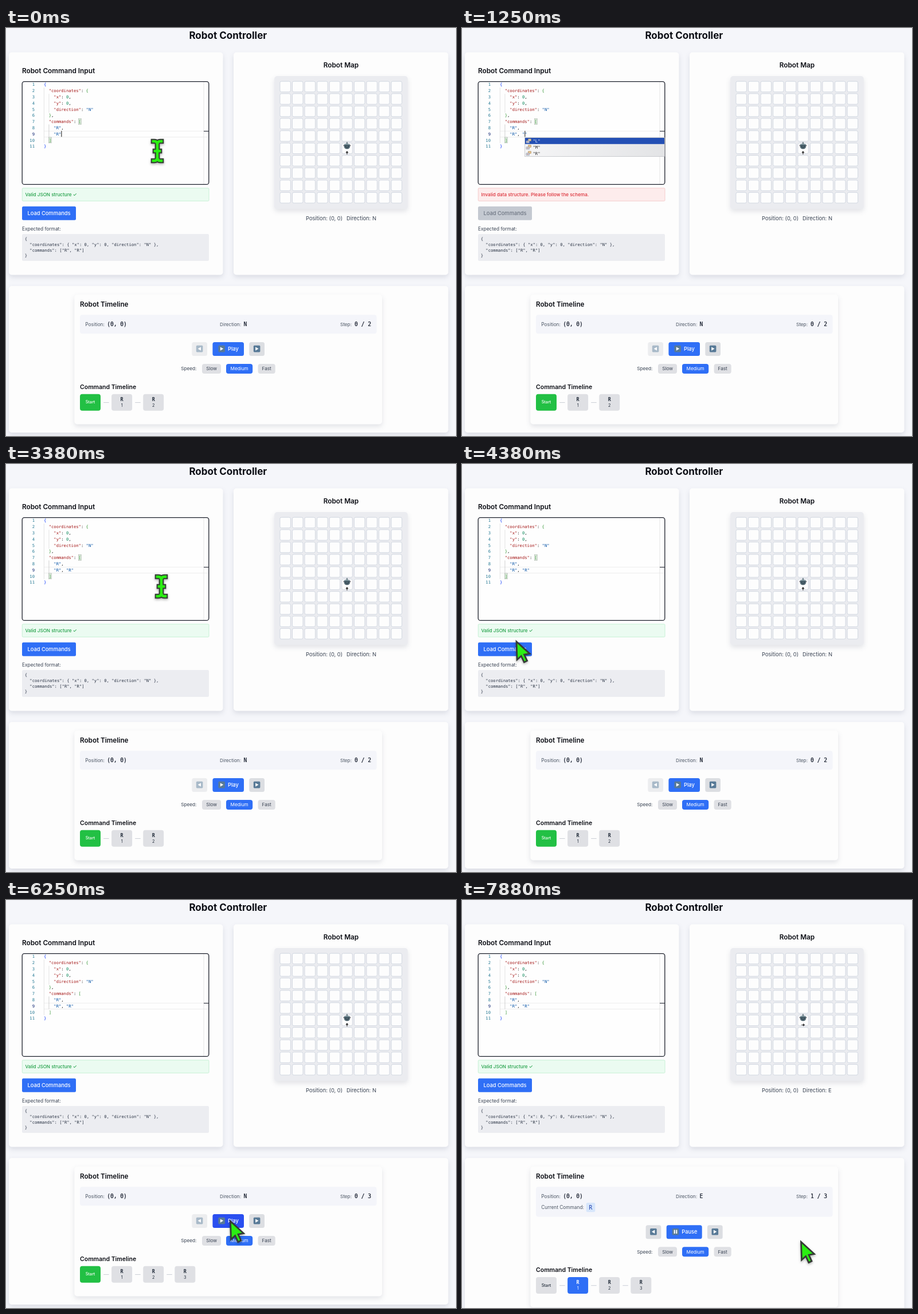
Write an HTML page that moves like this. It is 785 px wide and 713 px high and loops after 8000 ms.

```html
<!DOCTYPE html>
<html lang="en">
<head>
<meta charset="utf-8">
<title>Robot Controller</title>
<style>
  html, body { margin: 0; width: 100%; height: 100%; overflow: hidden; background: #f5f6fa; }
  svg { display: block; width: 785px; height: 713px; }
  text { font-family: Inter, "DejaVu Sans", sans-serif; white-space: pre; }
  .mono { font-family: "DejaVu Sans Mono", monospace; }
  .value { stroke: #111827; stroke-width: .2px; }
  .card { filter: drop-shadow(0 4px 4px rgba(30, 40, 70, .12)); }
  #pointer { filter: drop-shadow(0 2px 2px rgba(0, 0, 0, .3)); }
</style>
</head>
<body>
<svg viewBox="0 0 785 713">
  <g id="page"></g>
  <g id="pointer">
    <g id="beam" fill="none" stroke-linejoin="round"></g>
    <path id="arrow" d="M1.5 2.5L2.5 34 9.7 27.5 14.8 38.5 20 36 15 25.2 24.5 23.5Z"
      fill="#2bee12" stroke="#343b35" stroke-width="2.8"/>
  </g>
</svg>
<script>
const LOOP = 8000;
const BLUE = '#2f6ff6', GREY = '#dfe0e4', INK = '#0b0d14', SLATE = '#374151', PAPER = '#fdfdfd';
const CH = 4.335, LINE = 10.8, CODE_X = 66, CODE_Y = 101.4;

// Moments of the session
const COMMA = 380, SPACE = 630, QUOTE = 880, MARKER = 1750, PICK_M = 1880, PICK_R = 2380,
  ACCEPT = 2750, LOAD = 4750, PLAY = 6420, STEP = 7420;
const PATH = [
  [0, 264, 215], [3000, 264, 215], [3250, 271, 214], [3630, 271, 214],
  [4500, 84, 313], [5300, 84, 313], [6130, 390, 559], [6450, 390, 559], [7000, 590, 595]
];

const $ = id => document.getElementById(id);
const rect = (x, y, x2, y2, fill, r = 0, more = '') =>
  `<rect x="${x}" y="${y}" width="${x2 - x}" height="${y2 - y}" rx="${r}" fill="${fill}" ${more}/>`;
const text = (x, y, size, str, fill = INK, weight = 400, more = '') =>
  `<text x="${x}" y="${y}" font-size="${size}" fill="${fill}" font-weight="${weight}" ${more}>${str}</text>`;
const line = (x, y, x2, y2, stroke, w = .7) =>
  `<path d="M${x} ${y}L${x2} ${y2}" stroke="${stroke}" stroke-width="${w}"/>`;
const MID = 'text-anchor="middle"', MONO = 'class="mono"';
const border = (color, w = .7) => `stroke="${color}" stroke-width="${w}"`;

function highlight(src) {
  let depth = 0;
  const brackets = ['#0431fa', '#319331', '#7b3814'];
  return src.replace(/("\w*")(:?)|\d|[{}[\]]/g, (m, str, colon) => {
    let color;
    if (str) color = colon ? '#a31515' : '#0451a5';
    else if (/\d/.test(m)) color = '#098658';
    else color = brackets[/[{[]/.test(m) ? depth++ : --depth];
    return `<tspan fill="${color}">${str || m}</tspan>${colon || ''}`;
  });
}

function editor(s) {
  const y9 = CODE_Y + 8 * LINE;
  let out = rect(28, 93.5, 354, 273.5, '#fefefe', 4);
  out += line(CODE_X, 180.2, 353, 180.2, '#e6e6e6') + line(CODE_X, 190.6, 353, 190.6, '#e6e6e6');
  out += line(345, 94, 345, 273, '#dcdcdc');
  out += line(66.4, 104, 66.4, 201, '#d9d9d9') + line(74.9, 115, 74.9, 148, '#d9d9d9')
    + line(74.9, 168.5, 74.9, 190.5, '#bdbdbd');
  if (s.focus) {
    for (const [col, row] of [[14, 6], [2, 9]]) {
      out += rect(CODE_X + col * CH - .2, 93.8 + row * LINE, CODE_X + col * CH + CH + .2,
        103.6 + row * LINE, '#e3efe3', 0, border('#a9b5a9'));
    }
  }
  const src = `{
  "coordinates": {
    "x": 0,
    "y": 0,
    "direction": "N"
  },
  "commands": [
    "R",
    ${s.row}
  ]
}`;
  highlight(src).split('\n').forEach((code, i) => {
    const y = CODE_Y + i * LINE;
    out += text(50, y, 7.2, i + 1, i === 8 ? '#0b216f' : '#237893', 400, MONO + ' text-anchor="end"');
    out += text(CODE_X, y, 7.2, code, '#111', 400, MONO);
  });
  if (s.marker) out += rect(349, 180, 353.5, 190.5, '#c9705f');
  out += line(345, 180.4, 354, 180.4, '#3a3d48', 1.2);
  if (s.caret) {
    const x = CODE_X + s.col * CH + .5;
    out += line(x, y9 - 8, x, y9 + 2.4, '#111', 1);
  }
  out += rect(28.2, 93.6, 353.8, 273.4, 'none', 4, border('#1d212c', 1.3));
  if (s.pick >= 0) out += suggestions(s.pick);
  return out;
}

function suggestions(pick) {
  let out = rect(109.6, 191.6, 353.4, 224.4, 'url(#menu)', 0, border('#b9bbc0'));
  ['L', 'M', 'R'].forEach((name, i) => {
    const y = 192 + i * LINE, on = i === pick;
    if (on) out += rect(110, y, 353, y + LINE, '#234fb4');
    out += rect(115.5, y + 1.8, 120.5, y + 5.6, on ? '#d9c7a4' : '#e9c48c', .5, border('#a8895c', .6));
    out += rect(112, y + 5, 117.5, y + 9, on ? '#b9cdea' : '#d5dde8', .5, border('#7a8797', .6));
    out += line(113.3, y + 7, 116.2, y + 7, '#c2604a', .8);
    out += text(123.5, y + 7.9, 7.2, `"${name}"`, on ? '#fff' : '#222', 400, MONO);
  });
  return out;
}

function commandPanel(s) {
  const [fill, edge, color, msg] = s.valid
    ? ['#ebfbf1', '#b5ebc8', '#1f9f46', 'Valid JSON structure ✓']
    : ['#fdecec', '#f2bcbc', '#dc2f38', 'Invalid data structure. Please follow the schema.'];
  let out = rect(5, 42.5, 378.5, 431.5, PAPER, 5, 'class="card"');
  out += text(28, 79.3, 11.8, 'Robot Command Input', INK, 600) + editor(s);
  out += rect(28.3, 279.8, 354, 302.3, fill, 1.5, border(edge));
  out += text(33.5, 293.7, 8.15, msg, color, 500);
  out += rect(28, 311.8, 122, 335.8, s.valid ? BLUE : '#c4c9d1', 2.5);
  out += text(75, 327.3, 9.3, 'Load Commands', s.valid ? '#fff' : '#6d7582', 500, MID);
  out += text(28, 354.3, 8.4, 'Expected format:', SLATE) + rect(28, 360, 354, 407, '#ecedf1', 2.5);
  ['{', '  "coordinates": { "x": 0, "y": 0, "direction": "N" },', '  "commands": ["R", "R"]', '}']
    .forEach((row, i) => out += text(32.7, 371.4 + i * 9.6, 7.2, row, '#283142', 400, MONO));
  return out;
}

function robot(dir) {
  const turn = dir === 'E' ? 90 : 0;
  return `<g transform="translate(594.9 206)">
    <path d="M0-6.2V-3" stroke="#5f7078" stroke-width="1.6"/>
    <circle cy="-5.6" r="1.2" fill="#71848b"/>
    <path d="M-6.6-1.8L-4-.6V3L-6-.2ZM6.6-1.8L4-.6V3L6-.2Z" fill="#5b4a50"/>
    <path d="M-5.4-1.5Q-4.6-3.8 0-3.8T5.4-1.5L4.5 3.6Q3.4 5.6 0 5.6T-4.5 3.6Z" fill="#536a75"/>
    <path d="M-4.2-1.8Q0-3.8 4.2-1.8" fill="none" stroke="#8da5ad" stroke-width=".9"/>
    <circle cx="-2" cy=".3" r="1.1" fill="#1f3039"/><circle cx="2" cy=".3" r="1.1" fill="#1f3039"/>
    <path d="M-2.2 3.4H2.2" stroke="#273740"/>
    <path transform="translate(0 12.2) rotate(${turn})" d="M0 2.6V-2M-1.9-.2L0-2.3 1.9-.2"
      fill="none" stroke="#111" stroke-width="1.1"/>
  </g>`;
}

function mapPanel(s) {
  let out = rect(397, 42.5, 771.5, 431.5, PAPER, 5, 'class="card"');
  out += text(584.5, 69.3, 11.8, 'Robot Map', INK, 600, MID);
  out += rect(468.2, 84, 700.8, 316.5, '#ebecf0', 5, 'class="card"');
  for (let i = 0; i < 100; i++) {
    const x = 477.9 + i % 10 * 21.58, y = 93.2 + Math.floor(i / 10) * 21.58;
    out += rect(x, y, x + 18.5, y + 18.5, PAPER, 2.6, border('#cad1dc', .8));
  }
  out += robot(s.dir);
  out += text(523, 336.3, 9.35, 'Position: (0, 0)', SLATE);
  out += text(594, 336.3, 9.35, 'Direction: ' + s.dir, SLATE);
  return out;
}

// Square media symbol centred on x
function icon(x, y, kind) {
  const shape = {
    prev: 'M2.4-3.2V3.2L-3 0Z', next: 'M-2.4-3.2V3.2L3 0Z', pause: 'M-2.8-3.2H-.8V3.2H-2.8ZM.8-3.2H2.8V3.2H.8Z'
  }[kind];
  return `<g transform="translate(${x} ${y})">`
    + rect(-5.8, -5.8, 5.8, 5.8, '#587a97', 1.6) + `<path d="${shape}" fill="#fff"/></g>`;
}

function timelinePanel(s) {
  const dy = s.step ? 19.2 : 0;
  let out = rect(5, 451, 771.5, 707 + dy, PAPER, 5, 'class="card"');
  out += rect(119.3, 466, 656, 692.5 + dy, PAPER, 5, 'class="card"');
  out += text(129, 487.3, 11.7, 'Robot Timeline', INK, 600);
  out += rect(129, 501.2, 646.5, 534.3 + dy, '#f4f5fa', 4);
  const value = (x, str, more = '') => text(x, 521.4, 9.6, str, '#111827', 400, 'class="mono value" ' + more);
  out += text(138.3, 521.3, 8.3, 'Position:', '#4b5563') + value(176.2, '(0, 0)');
  out += text(373, 521.3, 8.2, 'Direction:', '#4b5563') + value(414.5, s.dir);
  out += text(583, 521.3, 8.2, 'Step:', '#4b5563') + value(637, `${s.step} / ${s.total}`, 'text-anchor="end"');
  if (s.step) {
    out += text(138.3, 540.2, 8.3, 'Current Command:', '#4b5563');
    out += rect(216.7, 529, 232.3, 545.2, '#d7e6fb', 2.5);
    out += text(224.5, 540.6, 9.6, 'R', '#1e40af', 400, MONO + MID.padStart(22));
  }

  const wide = s.playing ? 3.7 : 0;
  out += `<g transform="translate(0 ${dy})">`;
  out += `<g opacity="${s.step ? 1 : .5}">`
    + rect(324.3 - wide, 549, 351 - wide, 573, '#dcdee2', 3.5) + icon(337.6 - wide, 560.6, 'prev') + '</g>';
  out += rect(360.4 - wide, 549, 415 + wide, 573, s.hover ? '#2a4ff0' : BLUE, 3.5);
  out += icon(376.2 - wide, 560.6, s.playing ? 'pause' : 'next');
  out += text(387 - wide, 564.1, 9.3, s.playing ? 'Pause' : 'Play', '#fff', 500);
  out += rect(424.3 + wide, 549, 451 + wide, 573, '#dcdee2', 3.5) + icon(437.6 + wide, 560.6, 'next');

  out += text(305.3, 598.4, 8.2, 'Speed:', SLATE);
  for (const [x, x2, name] of [[342, 375, 'Slow'], [384, 430.2, 'Medium'], [439.6, 469.7, 'Fast']]) {
    const on = name === 'Medium';
    out += rect(x, 587, x2, 604, on ? BLUE : GREY, 4);
    out += text((x + x2) / 2, 598.4, 8.2, name, on ? '#fff' : SLATE, 400, MID);
  }

  out += text(129, 630.8, 10.5, 'Command Timeline', INK, 600);
  for (let i = 0; i <= s.total; i++) {
    const x = 129 + i * 55.1, on = i === s.step, ink = on ? '#fff' : '#1f2937';
    if (i) out += line(x - 14, 654.5, x - 4.5, 654.5, '#cdd1d8', 1.1);
    out += rect(x, 639.8, x + 36, 668.8, on ? (i ? BLUE : '#22c044') : GREY, 4);
    if (i) {
      out += text(x + 18, 651.8, 8.4, 'R', ink, 700, MONO + ' ' + MID);
      out += text(x + 18, 662, 7.2, i, ink, 400, MID);
    } else {
      out += text(x + 18, 656.4, 7.2, 'Start', ink, 500, MID);
    }
  }
  return out + '</g>';
}

function stateAt(t) {
  const typed = t >= ACCEPT ? ['"R", "R"', 12, ACCEPT] : t >= QUOTE ? ['"R", ""', 10, QUOTE]
    : t >= SPACE ? ['"R", ', 9, SPACE] : t >= COMMA ? ['"R",', 8, COMMA] : ['"R"', 7, 0];
  const focus = t < LOAD;
  return {
    row: typed[0], col: typed[1], focus,
    caret: focus && (t - typed[2]) % 1000 < 500,
    valid: t < COMMA || t >= ACCEPT,
    marker: t >= MARKER && t < ACCEPT,
    pick: t < QUOTE || t >= ACCEPT ? -1 : t < PICK_M ? 0 : t < PICK_R ? 1 : 2,
    total: t < LOAD ? 2 : 3,
    playing: t >= PLAY,
    hover: t >= 6080 && t < 6520,
    step: t < STEP ? 0 : 1,
    dir: t < STEP ? 'N' : 'E'
  };
}

function pointerAt(t) {
  const i = PATH.findIndex(p => p[0] > t);
  if (i < 0) return PATH[PATH.length - 1].slice(1);
  const [a, b] = [PATH[i - 1], PATH[i]];
  const k = (t - a[0]) / (b[0] - a[0]), e = k * k * (3 - 2 * k);
  return [a[1] + (b[1] - a[1]) * e, a[2] + (b[2] - a[2]) * e];
}

const beamPath = 'M-7-17H-5Q0-17 0-11Q0-17 5-17H7M0-12V12M-7 17H-5Q0 17 0 11Q0 17 5 17H7M-4 0H4';
$('beam').innerHTML = [['#343b35', 8.6], ['#2bee12', 4.6]].map(([color, w]) =>
  `<path d="${beamPath}" stroke="${color}" stroke-width="${w}" stroke-linecap="square"/>`).join('');

const defs = `<defs><linearGradient id="menu"><stop stop-color="#f5f5f6"/>
  <stop offset="1" stop-color="#e3e4e6"/></linearGradient></defs>`;
let shown = '';

function draw(t) {
  const s = stateAt(t), key = JSON.stringify(s);
  if (key !== shown) {
    shown = key;
    $('page').innerHTML = defs + rect(0, 0, 785, 713, '#f5f6fa')
      + text(387.3, 19.4, 17, 'Robot Controller', INK, 700, MID)
      + commandPanel(s) + mapPanel(s) + timelinePanel(s);
  }
  const [x, y] = pointerAt(t), inEditor = y < 273;
  $('pointer').setAttribute('transform', `translate(${x} ${y})`);
  $('pointer').style.display = t >= COMMA && t < 3000 ? 'none' : '';
  $('beam').style.display = inEditor ? '' : 'none';
  $('arrow').style.display = inEditor ? 'none' : '';
}

const start = performance.now();
function tick() {
  draw((performance.now() - start) % LOOP);
  requestAnimationFrame(tick);
}
tick();
</script>
</body>
</html>
```
